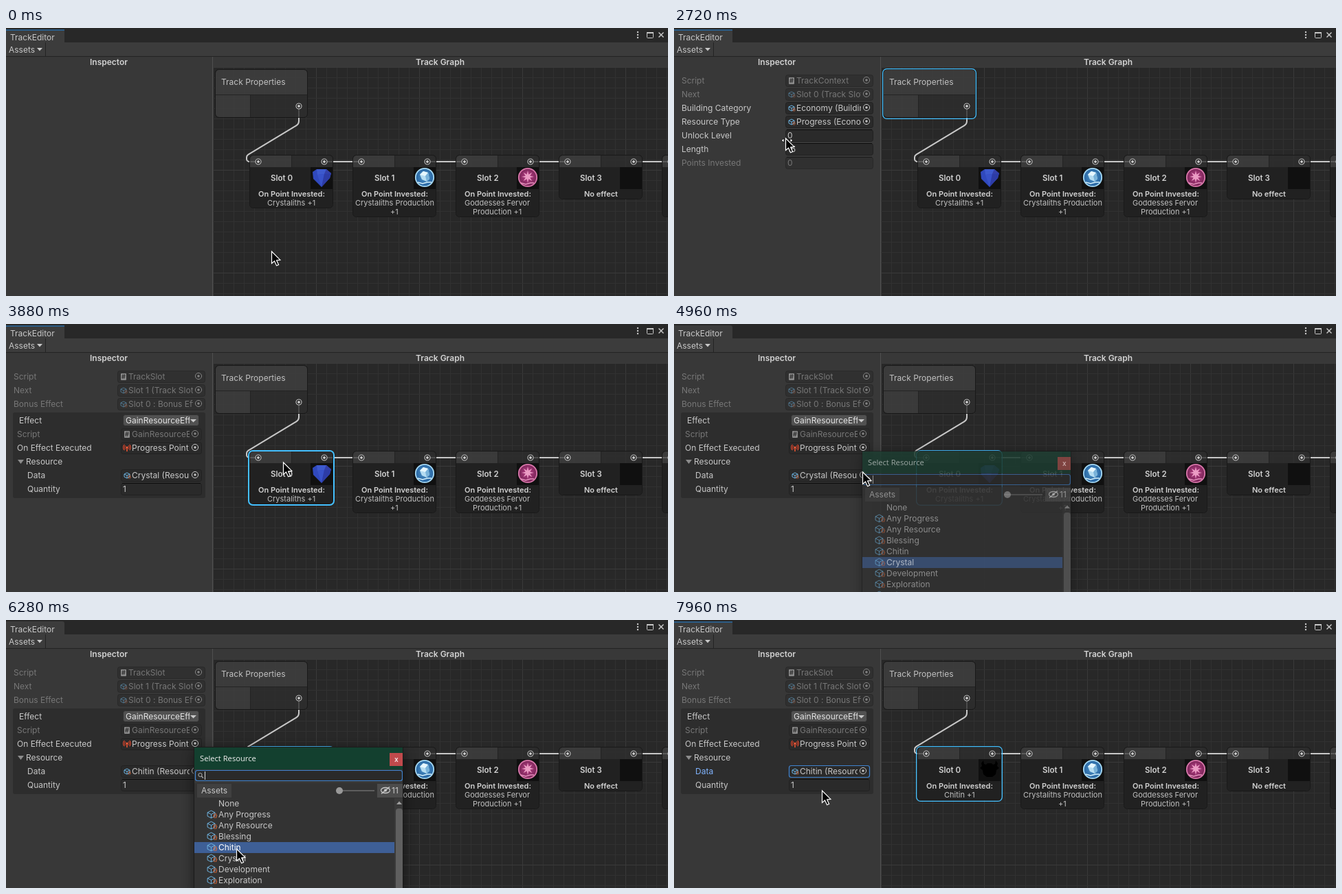
Animation, 963 px wide and 391 px high, one loop 8 s. Source, as an HTML page with a canvas:

```html
<!DOCTYPE html>
<html lang="en">
<head>
<meta charset="utf-8">
<title>Track editor</title>
<style>
html, body { margin: 0; width: 100%; height: 100%; overflow: hidden; background: #282828; }
canvas { display: block; }
</style>
</head>
<body>
<canvas id="stage" width="963" height="391"></canvas>
<script>
const ctx = document.getElementById('stage').getContext('2d');
const W = 963, H = 391, LOOP = 8000, STEP = 40;
const TEXT = '#c8c8c8', DIM = '#777777', BLUE = '#44c0ff', FOCUS = '#3f83cf', TAB = '#2c5d87', SLOT_BG = '#101010';

// Pointer path: time, x, y of the tip
const path = [
  [0, 386, 325], [440, 386, 325], [640, 385, 285], [800, 392, 215], [960, 390, 150], [1120, 372, 105],
  [1680, 372, 105], [1880, 290, 120], [2040, 190, 150], [2160, 156, 160],
  [2680, 156, 160], [2720, 162, 160], [2880, 235, 118], [3040, 330, 140], [3240, 403, 201],
  [4200, 403, 201], [4400, 350, 206], [4760, 274, 215],
  [5160, 274, 215], [5560, 303, 287], [5800, 335, 350], [5960, 335, 333],
  [7040, 335, 333], [7080, 361, 317], [7200, 385, 260], [7360, 400, 214],
  [7560, 400, 214], [7760, 300, 257], [7960, 215, 248]
];

const slots = [
  { x: 355, h: 76, icon: gem, lines: ['Crystaliths +1'] },
  { x: 505, h: 89, icon: crystalOrb, lines: ['Crystaliths Production', '+1'] },
  { x: 655, h: 89, icon: starOrb, lines: ['Goddesses Fervor', 'Production +1'] },
  { x: 805, h: 63, icon: null, lines: null },
  { x: 955, h: 89, icon: null, lines: ['Goddesses Fervor', 'Production +1'] }
];

const resources = ['None', 'Any Progress', 'Any Resource', 'Blessing', 'Chitin', 'Crystal', 'Development', 'Exploration', 'Faith'];

function pointerAt(t) {
  let i = 1;
  while (i < path.length - 1 && path[i][0] < t) i++;
  const [t0, x0, y0] = path[i - 1], [t1, x1, y1] = path[i];
  const k = Math.min(1, Math.max(0, (t - t0) / (t1 - t0)));
  return { x: x0 + (x1 - x0) * k, y: y0 + (y1 - y0) * k };
}

const inside = (p, x, y, w, h) => p.x >= x && p.x < x + w && p.y >= y && p.y < y + h;

function stateAt(t) {
  const p = pointerAt(t);
  let popup = 0;
  if (t >= 4960 && t < 6680) popup = t < 5040 ? 0.6 : t < 6560 ? 1 : t < 6600 ? 0.6 : 0.25;
  const free = !popup;
  return {
    p, popup,
    selected: t < 1240 ? '' : t < 3800 ? 'track' : 'slot',
    chitin: t >= 6240,
    focused: t < 4960 || t >= 6600,
    overTrack: free && inside(p, 304, 60, 135, 71),
    overSlot: free && inside(p, 354, 185, 122, 78),
    dragging: t >= 1240 && t < 3800 && inside(p, 11, 148, 152, 38)
  };
}

// Drawing helpers
function box(x, y, w, h, fill) {
  ctx.fillStyle = fill;
  ctx.fillRect(x, y, w, h);
}

function round(x, y, w, h, r, fill, stroke, lw = 1) {
  ctx.beginPath();
  ctx.roundRect(x, y, w, h, r);
  if (fill) { ctx.fillStyle = fill; ctx.fill(); }
  if (stroke) { ctx.strokeStyle = stroke; ctx.lineWidth = lw; ctx.stroke(); }
}

function poly(points, fill, stroke, lw = 1) {
  ctx.beginPath();
  for (let i = 0; i < points.length; i += 2) ctx.lineTo(points[i], points[i + 1]);
  if (fill) { ctx.closePath(); ctx.fillStyle = fill; ctx.fill(); }
  if (stroke) { ctx.strokeStyle = stroke; ctx.lineWidth = lw; ctx.stroke(); }
}

function disc(x, y, r, fill, stroke, lw = 1) {
  ctx.beginPath();
  ctx.arc(x, y, r, 0, Math.PI * 2);
  if (fill) { ctx.fillStyle = fill; ctx.fill(); }
  if (stroke) { ctx.strokeStyle = stroke; ctx.lineWidth = lw; ctx.stroke(); }
}

// Centred text starts on a whole pixel
function text(str, x, mid, { color = TEXT, size = 12, weight = 400, center = false, family = 'Inter' } = {}) {
  ctx.font = `${weight} ${size}px ${family}, sans-serif`;
  ctx.fillStyle = color;
  const left = center ? Math.round(x - ctx.measureText(str).width / 2) : x;
  ctx.fillText(str, left, mid + 4);
}

function clipped(x, y, w, h, draw) {
  ctx.save();
  ctx.beginPath();
  ctx.rect(x, y, w, h);
  ctx.clip();
  draw();
  ctx.restore();
}

function port(x, y) {
  disc(x, y, 4, '#212121', '#c8c8c8', 1.1);
  disc(x, y, 2, '#c8c8c8');
}

// Slot pictures, drawn around their centre
function gem(x, y) {
  poly([x - 13, y - 8, x - 7, y - 12, x + 7, y - 12, x + 14, y - 6, x + 12, y + 1, x, y + 14, x - 12, y + 2], '#3049bd');
  poly([x - 7, y - 12, x + 7, y - 12, x + 4, y - 5, x - 6, y - 4], '#3d5ace');
  poly([x - 6, y - 4, x + 4, y - 5, x, y + 14], '#3852c9');
  poly([x + 7, y - 12, x + 14, y - 6, x + 4, y - 5], '#3440a8');
  poly([x + 14, y - 6, x + 12, y + 1, x, y + 14, x + 4, y - 5], '#2d3ca6');
}

function orb(x, y, inner, outer, ring) {
  const g = ctx.createRadialGradient(x, y - 2, 2, x, y, 14);
  g.addColorStop(0, inner);
  g.addColorStop(1, outer);
  disc(x, y, 13.2, g, ring, 1.8);
}

function crystalOrb(x, y) {
  orb(x, y, '#4b8fc4', '#24619f', '#a5d8f2');
  poly([x - 7, y - 4, x - 2, y - 9, x + 5, y - 7, x + 7, y + 2, x + 3, y + 6, x - 4, y + 3], '#b5dcf1');
  poly([x - 2, y - 9, x + 5, y - 7, x + 1, y - 2, x - 7, y - 4], '#e6f6fd');
  poly([x + 1, y - 2, x + 5, y - 7, x + 7, y + 2, x + 3, y + 6], '#79b2d9');
  poly([x - 10, y + 7, x - 3, y + 9, x + 4, y + 7, x + 10, y + 7], null, '#d3effa', 1.6);
}

function starOrb(x, y) {
  orb(x, y, '#ad3a7e', '#782556', '#d877aa');
  const pts = [];
  for (let i = 0; i < 16; i++) {
    const r = i % 2 ? 3.5 : 9, a = i * Math.PI / 8 - Math.PI / 2;
    pts.push(x + r * Math.cos(a), y - 1 + r * Math.sin(a));
  }
  poly(pts, '#eb9cc4');
  poly([x - 10, y + 8, x - 3, y + 10, x + 4, y + 8, x + 9, y + 8], null, '#e591bd', 1.4);
}

function beetle(x, y) {
  const half = [3, -9, 5, -7, 8, -8, 9, -13, 12, -9, 11, -5, 14, -2, 10, 1, 9, 7, 4, 11];
  const pts = [];
  for (let i = 0; i < half.length; i += 2) {
    pts.push(x + half[i], y + half[i + 1]);
    pts.unshift(x - half[i], y + half[i + 1]);
  }
  poly(pts, '#000000');
}

// Small inspector icons
function assetIcon(x, y, s, dim) {
  ctx.save();
  if (dim) ctx.globalAlpha *= 0.5;
  const c = '#6db1dd';
  poly([x, y - s, x + s, y - s / 2, x + s, y + s / 2, x, y + s, x - s, y + s / 2, x - s, y - s / 2, x, y - s], null, c);
  poly([x - s, y - s / 2, x, y, x + s, y - s / 2], null, c);
  poly([x, y, x, y + s], null, c);
  text('{}', x + s - 3, y + s - 4.5, { color: '#f0703a', size: s * 1.4, weight: 600 });
  ctx.restore();
}

function scriptIcon(x, y) {
  round(x - 4, y - 5, 8, 10, 1, '#8a8a8a');
  text('#', x, y - 0.8, { color: '#333', size: 9, weight: 700, center: true });
}

function eventIcon(x, y) {
  disc(x, y - 1, 1.6, '#ff5a36');
  poly([x, y, x, y + 5], null, '#ff5a36', 1.4);
  ctx.strokeStyle = '#e2462c';
  ctx.lineWidth = 1.1;
  for (const r of [3.3, 5.4]) {
    for (const a of [0, Math.PI]) {
      ctx.beginPath();
      ctx.arc(x, y - 1, r, a - 0.85, a + 0.85);
      ctx.stroke();
    }
  }
}

function field(x, y, w, focus) {
  round(x + 0.5, y - 8.5, w - 1, 17, 3, '#2a2a2a', focus ? FOCUS : '#212121', focus ? 1.2 : 1);
}

function objectField(x, y, w, icon, value, dim, focus) {
  ctx.save();
  if (dim) ctx.globalAlpha = 0.55;
  field(x, y, w, focus);
  ctx.restore();
  icon(x + 9, y, 4, dim);
  clipped(x + 15, y - 9, w - 33, 18, () => text(value, x + 16, y, { color: dim ? DIM : TEXT }));
  const c = dim ? '#858585' : '#c4c4c4';
  disc(x + w - 10, y - 1, 4.6, null, c);
  disc(x + w - 10, y - 1, 1.7, c);
}

function inputField(x, y, w, value, dim) {
  ctx.save();
  if (dim) ctx.globalAlpha = 0.55;
  field(x, y, w);
  box(x + 2, y - 9, w - 4, 1, '#0d0d0d');
  ctx.restore();
  text(value, x + 3, y, { color: dim ? DIM : TEXT });
}

// Scene parts
function grid() {
  box(301, 57, W - 301, H - 57, '#282828');
  const shade = n => n % 10 ? '#313131' : '#3a3a3a';
  for (let n = 0; 301 + n * 15 < W; n++) box(301 + n * 15, 57, 1, H, shade(n));
  for (let n = 0; 57 + n * 15 < H; n++) box(301, 57 + n * 15, W, 1, shade(n));
}

function edges() {
  ctx.strokeStyle = '#c8c8c8';
  ctx.lineWidth = 2;
  ctx.beginPath();
  ctx.moveTo(426, 114);
  ctx.arcTo(426, 140, 350, 186, 7);
  ctx.arcTo(350, 186, 350, 195, 5);
  ctx.arcTo(350, 195, 363, 195, 4);
  ctx.lineTo(363, 195);
  ctx.stroke();
  for (const s of slots) poly([s.x + 108, 195, s.x + 162, 195], null, '#c8c8c8', 2);
}

function outline(x, y, w, h, selected, hover) {
  if (!selected && !hover) return;
  const lw = selected && hover ? 2 : 1.3;
  const color = selected ? BLUE : 'rgba(68,192,255,.5)';
  round(x + lw / 2, y + lw / 2, w - lw, h - lw, 6, null, color, lw);
}

function trackNode(s) {
  ctx.save();
  ctx.beginPath();
  ctx.roundRect(305, 61, 133, 69, 5);
  ctx.clip();
  box(305, 61, 133, 36, 'rgba(63,63,63,.85)');
  box(305, 97, 133, 1, '#232323');
  box(305, 98, 50, 33, 'rgba(63,63,63,.8)');
  box(355, 98, 1, 33, '#232323');
  box(356, 98, 83, 33, 'rgba(46,46,46,.8)');
  ctx.restore();
  round(304.5, 60.5, 134, 70, 5, null, '#191919');
  text('Track Properties', 313, 79, { color: '#c1c1c1' });
  if (s.overTrack) poly([422, 78, 426, 82, 430, 78], null, '#a0a0a0', 1.2);
  port(426, 114);
  outline(303, 59, 137, 74, s.selected === 'track', s.overTrack);
}

function slotNode(slot, i, s) {
  const { x, h } = slot, y = 186;
  const changed = i === 0 && s.chitin;
  ctx.save();
  ctx.beginPath();
  ctx.roundRect(x, y, 120, h, 5);
  ctx.clip();
  box(x, y, 60, 17, 'rgba(63,63,63,.8)');
  box(x + 60, y, 1, 17, '#232323');
  box(x + 61, y, 59, 17, 'rgba(46,46,46,.8)');
  box(x, y + 17, 120, h, '#212121');
  box(x + 88, y + 17, 32, 32, SLOT_BG);
  ctx.restore();
  round(x - 0.5, y - 0.5, 121, h + 1, 5, null, '#191919');
  port(x + 12, 195);
  port(x + 108, 195);
  const bold = { size: 11, weight: 600, center: true, color: '#d2d2d2' };
  text('Slot ' + i, x + 46, 219, { ...bold, size: 11.5 });
  const icon = changed ? beetle : slot.icon;
  if (icon) icon(x + 104, 218);
  if (slot.lines) {
    text('On Point Invested:', x + 60, 242, bold);
    const lines = changed ? ['Chitin +1'] : slot.lines;
    lines.forEach((line, n) => text(line, x + 60, 255 + n * 13, { size: 11, center: true, color: '#c1c1c1' }));
  } else {
    text('No effect', x + 60, 242, bold);
  }
  if (i === 0) outline(x - 3, y - 2, 126, h + 5, s.selected === 'slot', s.overSlot);
}

function trackInspector() {
  const labels = ['Script', 'Next', 'Building Category', 'Resource Type', 'Unlock Level', 'Length', 'Points Invested'];
  labels.forEach((l, i) => text(l, 11, 77 + i * 20, { color: [0, 1, 6].includes(i) ? DIM : TEXT }));
  objectField(162, 77, 128, scriptIcon, 'TrackContext', true);
  objectField(162, 97, 128, assetIcon, 'Slot 0 (Track Slot)', true);
  objectField(162, 117, 128, assetIcon, 'Economy (Building Category)');
  objectField(162, 137, 128, assetIcon, 'Progress (Economy Resource)');
  inputField(162, 157, 128, '0');
  inputField(162, 177, 128, '15');
  inputField(162, 197, 128, '0', true);
}

function slotInspector(s) {
  const dim = { color: DIM };
  ['Script', 'Next', 'Bonus Effect'].forEach((l, i) => text(l, 11, 77 + i * 20, dim));
  objectField(162, 77, 128, scriptIcon, 'TrackSlot', true);
  objectField(162, 97, 128, assetIcon, 'Slot 1 (Track Slot)', true);
  objectField(162, 117, 128, assetIcon, 'Slot 0 : Bonus Effect', true);
  round(10, 129, 280, 125, 3, '#2d2d2d');
  text('Effect', 19, 141);
  round(170.5, 132.5, 110, 16, 3, '#515151', '#303030');
  clipped(172, 132, 95, 18, () => text('GainResourceEffect', 174, 141, { color: '#e4e4e4' }));
  poly([268, 139, 277, 139, 272.5, 143.5], '#c8c8c8');
  text('Script', 16, 161, dim);
  objectField(167, 161, 118, scriptIcon, 'GainResourceEffect', true);
  text('On Effect Executed', 16, 181);
  objectField(167, 181, 118, eventIcon, 'Progress Point Invested');
  poly([17, 198, 26, 198, 21.5, 204], '#8c8c8c');
  text('Resource', 29, 201);
  const focus = s.chitin && s.focused;
  text('Data', 31, 221, { color: focus ? '#81b4ff' : TEXT });
  objectField(167, 221, 118, assetIcon, s.chitin ? 'Chitin (Resource)' : 'Crystal (Resource)', false, focus);
  text('Quantity', 31, 241);
  inputField(167, 241, 118, '1');
}

function chrome(s) {
  box(0, 0, W, 21, '#282828');
  round(0, 2, 85, 20, [0, 3, 0, 0], '#3c3c3c');
  if (s.focused) box(0, 2, 85, 2, TAB);
  text('TrackEditor', 6, 14);
  for (const y of [6, 10, 14]) disc(919, y, 1.2, TEXT);
  round(932.5, 6.5, 9, 8, 1, null, TEXT);
  box(932, 6, 10, 2, TEXT);
  poly([949.5, 6.5, 956.5, 13.5], null, TEXT, 1.4);
  poly([956.5, 6.5, 949.5, 13.5], null, TEXT, 1.4);
  box(0, 21, W, 20, '#3c3c3c');
  box(0, 41, W, 1, '#232323');
  box(57, 21, 1, 20, '#232323');
  text('Assets', 4, 32);
  poly([45, 29, 53, 29, 49, 33.5], TEXT);
  box(301, 42, W - 301, 15, '#383838');
  box(300, 42, 1, H, '#505050');
  const head = { weight: 600, center: true, color: '#d2d2d2' };
  text('Inspector', 149.5, 50, head);
  text('Track Graph', 631, 50, head);
}

function eye(x, y) {
  ctx.strokeStyle = TEXT;
  ctx.lineWidth = 1.3;
  ctx.beginPath();
  ctx.ellipse(x, y, 6.5, 4, 0, 0, Math.PI * 2);
  ctx.stroke();
  disc(x, y, 2, TEXT);
  poly([x - 6, y + 5, x + 6, y - 5], null, TEXT, 1.4);
}

function popup(s) {
  ctx.save();
  ctx.globalAlpha = s.popup;
  ctx.save();
  ctx.shadowColor = 'rgba(0,0,0,.55)';
  ctx.shadowBlur = 18;
  ctx.shadowOffsetY = 4;
  box(274, 186, 303, 215, '#383838');
  ctx.restore();
  box(274, 186, 303, 32, '#13402f');
  text('Select Resource', 282, 202, { size: 11.2, family: "'Open Sans'", color: '#f2f2f2' });
  box(558, 194, 19, 19, '#c04a4c');
  text('x', 567.5, 203, { size: 10, weight: 600, center: true, color: '#f4e6e6' });

  round(275.5, 219.5, 301, 15, 3, '#2a2a2a', FOCUS, 1.2);
  disc(282.5, 226, 2.6, null, '#b0b0b0');
  poly([284.5, 228, 287, 230.5], null, '#b0b0b0', 1.3);
  box(289, 221, 1, 12, '#d8d8d8');

  box(274, 238, 303, 22, '#333333');
  box(278, 239, 50, 20, '#404040');
  text('Assets', 284, 249);
  box(480, 248, 56, 2, '#5e5e5e');
  disc(485, 249, 5, '#999999');
  box(540, 239, 37, 20, '#4c4c4c');
  eye(552, 248.5);
  text('11', 561, 249);

  box(274, 260, 291, 131, '#333333');
  const chosen = s.chitin ? 4 : 5;
  resources.forEach((name, i) => {
    const y = 268 + i * 16;
    if (i === chosen) box(274, y - 8, 291, 16, '#3e5f96');
    if (i) assetIcon(298.5, y - 0.5, 5.4);
    text(name, 309, y, { color: i === chosen ? '#ffffff' : TEXT });
  });
  box(565, 260, 12, 131, '#3a3a3a');
  poly([568, 269, 576, 269, 572, 264.5], '#a0a0a0');
  round(567, 275, 10, 130, 4, '#5f5f5f');
  ctx.strokeStyle = '#1b1b1b';
  ctx.lineWidth = 1;
  ctx.strokeRect(273.5, 185.5, 304, 220);
  ctx.restore();
}

function pointer({ p, dragging }) {
  ctx.save();
  ctx.translate(Math.round(p.x), Math.round(p.y));
  if (dragging) {
    for (const [x, d] of [[-2, -1], [7, 1]]) poly([x, 1, x + 4 * d, 4, x, 7], '#ffffff', '#000000', 0.8);
  }
  ctx.beginPath();
  const shape = [0.5, 1, 0.5, 18.5, 4.5, 15, 7.6, 21.7, 10.6, 20.4, 7.6, 13.9, 12.9, 13.4];
  for (let i = 0; i < shape.length; i += 2) ctx.lineTo(shape[i], shape[i + 1]);
  ctx.closePath();
  ctx.fillStyle = '#000000';
  ctx.fill();
  ctx.strokeStyle = '#ffffff';
  ctx.lineWidth = 1.2;
  ctx.stroke();
  ctx.restore();
}

function render(t) {
  const s = stateAt(t);
  grid();
  edges();
  trackNode(s);
  slots.forEach((slot, i) => slotNode(slot, i, s));
  box(0, 42, 300, H, '#383838');
  if (s.selected === 'track') trackInspector();
  if (s.selected === 'slot') slotInspector(s);
  chrome(s);
  if (s.popup) popup(s);
  pointer(s);
}

const start = performance.now();
function tick() {
  const t = Math.max(0, performance.now() - start) % LOOP;
  render(Math.floor(t / STEP) * STEP);
  requestAnimationFrame(tick);
}
tick();
</script>
</body>
</html>
```
